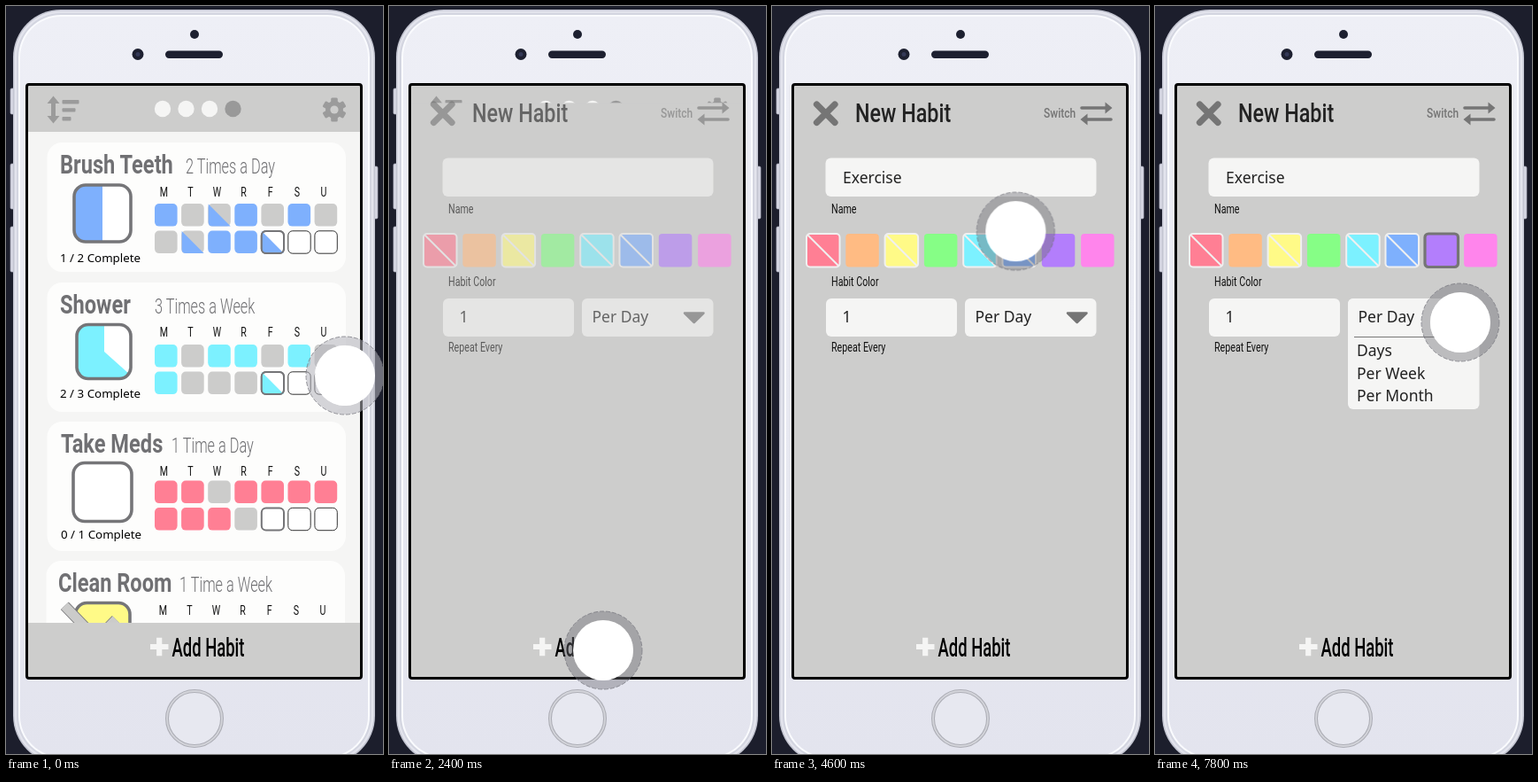
An HTML page that plays this animation: 426 by 844 pixels, repeating every 8000 ms.

```html
<!DOCTYPE html>
<html lang="en">
<head>
<meta charset="utf-8">
<title>Habit tracker</title>
<style>
  html, body { margin: 0; width: 100%; height: 100%; overflow: hidden; background: #1c1e2c; }
  svg { display: block; width: 426px; height: 844px; }
  text { font-family: "Noto Sans", "Open Sans", sans-serif; fill: #111; }
  .title { font: 600 29px Roboto, sans-serif; fill: #707073; }
  .light { font: 300 23px Roboto, sans-serif; fill: #6f6f72; }
  .day { font: 400 14px Roboto, sans-serif; text-anchor: middle; }
  .label { font: 400 15.3px Roboto, sans-serif; }
  .button { font: 500 29px Roboto, sans-serif; fill: #000; }
  .heading { font: 500 29.5px Roboto, sans-serif; fill: #222; }
  .switch { font: 500 15px Roboto, sans-serif; fill: #757575; }
  .note { font-size: 13.35px; fill: #000; }
  .input { font-size: 17.5px; fill: #222; }

  #list, #bar, #sheet, #form, #typed, #picked, #menu, #touch, #ring {
    animation: 8s linear infinite both;
  }
  #list { animation-name: scroll; }
  #bar { animation-name: bar; }
  #sheet { animation-name: rise; transform-origin: 0 757px; }
  #form { animation-name: form; }
  #typed { animation-name: typed; }
  #picked { animation-name: picked; }
  #menu { animation-name: menu; }
  #touch { animation-name: touch; }
  #ring { animation-name: ring; }

  @keyframes scroll {
    0%, 1.9% { transform: translateY(0); animation-timing-function: ease-in-out; }
    7%, 13% { transform: translateY(-87px); }
    17%, 100% { transform: translateY(-86px); }
  }
  @keyframes bar {
    0%, 1.9% { opacity: 0; }
    3.5%, 11% { opacity: 1; }
    15%, 100% { opacity: 0; }
  }
  @keyframes rise {
    0%, 27% { transform: scaleY(.0915); animation-timing-function: ease-out; }
    30.5%, 100% { transform: scaleY(1); }
  }
  @keyframes form {
    0%, 28.5% { opacity: 0; }
    31%, 100% { opacity: 1; }
  }
  @keyframes typed {
    0%, 47% { opacity: 0; }
    51%, 100% { opacity: 1; }
  }
  @keyframes picked {
    0%, 65% { opacity: 0; }
    67.5%, 100% { opacity: 1; }
  }
  @keyframes menu {
    0%, 92.5% { opacity: 0; }
    95.5%, 100% { opacity: 1; }
  }
  @keyframes touch {
    0%, 15% { transform: translate(383px, 417px); animation-timing-function: ease-in-out; }
    23.75%, 31.25% { transform: translate(242px, 727px); animation-timing-function: ease-in; }
    35% { transform: translate(183px, 512px); animation-timing-function: ease-out; }
    40%, 55% { transform: translate(110px, 196px); animation-timing-function: ease-in; }
    57.5% { transform: translate(275px, 254px); animation-timing-function: ease-out; }
    60.5%, 76% { transform: translate(324px, 276px); animation-timing-function: ease-in; }
    82.5% { transform: translate(226px, 329px); animation-timing-function: ease-out; }
    89%, 100% { transform: translate(345px, 357px); }
  }
  @keyframes ring {
    0%, 15% { stroke: #b4b4bc; opacity: .55; }
    23%, 100% { stroke: #6e6e76; opacity: .42; }
  }
</style>
</head>
<body>
<svg id="stage" viewBox="0 0 426 844"></svg>
<script>
const GREY = '#cdcdcc', EDGE = '#757578', PALE = '#f5f5f4';
const RED = '#ff7f94', YELLOW = '#fffa87', CYAN = '#7cf1ff', BLUE = '#7eb0fd';

const rect = (x, y, w, h, r, fill, extra = '') =>
  `<rect x="${x}" y="${y}" width="${w}" height="${h}" rx="${r}" fill="${fill}" ${extra}/>`;
const circle = (x, y, r, fill, extra = '') =>
  `<circle cx="${x}" cy="${y}" r="${r}" fill="${fill}" ${extra}/>`;
const path = (d, fill, extra = '') => `<path d="${d}" fill="${fill}" ${extra}/>`;
const line = (d, color, width, extra = '') =>
  path(d, 'none', `stroke="${color}" stroke-width="${width}" ${extra}`);
const group = (id, ...parts) => `<g id="${id}">${parts.join('')}</g>`;

// Condensed look of each text style
const narrow = { title: .815, light: .71, day: .76, label: .7, button: .635, heading: .79, switch: .8 };
const text = (style, x, y, words) =>
  `<text class="${style}" transform="translate(${x} ${y}) scale(${narrow[style] || 1} 1)">${words}</text>`;

function phone() {
  const key = (x, y, h) => rect(x, y, 5, h, 1.5, '#d5d6e2', 'stroke="#a9abba" stroke-width=".7"');
  const shell = (inset, fill) =>
    rect(8 + inset, 4 + inset, 409 - 2 * inset, 851 - 2 * inset, 54 - inset, fill);
  return key(5, 93, 29) + key(5, 178, 51) + key(5, 249, 51) + key(415, 181, 59)
    + shell(0, '#c3c5d1') + shell(1.5, '#e3e4ed') + shell(4, '#d3d5e0')
    + shell(6, '#fafbfe') + shell(8, 'url(#shell)')
    + circle(213, 32, 5, '#1d2030')
    + circle(149, 54.5, 6.5, '#1d2030') + circle(149, 54.5, 2.5, '#343957')
    + rect(180, 50.5, 65, 8.5, 4.2, '#1d2030')
    + circle(213, 804, 31, '#e7e8f0', 'stroke="#adaeb6" stroke-width="4"')
    + circle(213, 804, 31, 'none', 'stroke="#d3d4da" stroke-width="1.8"');
}

// c: done, g: missed, h: half done, t: today, p: today half done, e: to come
function cell(kind, x, y, color) {
  const half = path(`M${x + .5} ${y + .5}V${y + 21}q0 4.5 4.5 4.5H${x + 25.5}Z`, color);
  const border = fill => rect(x + .4, y + .4, 25.2, 25.2, 5, fill, `stroke="${EDGE}" stroke-width="2"`);
  return {
    c: rect(x, y, 25.6, 25.6, 5, color),
    g: rect(x, y, 25.6, 25.6, 5, '#cccccb'),
    h: rect(x, y, 25.6, 25.6, 5, '#cccccb') + half,
    t: border('#fff'),
    p: border('#fff') + half + border('none'),
    e: rect(x + .3, y + .3, 25.4, 25.4, 5, '#fff', 'stroke="#333" stroke-width="1"'),
  }[kind];
}

const cards = [
  { name: 'Brush Teeth', x: 46.5, top: 154, nameX: 61, often: '2 Times a Day', oftenX: 203, note: '1 / 2 Complete', noteX: 61,
    noteY: 288.5, box: [77, 202, 64], color: BLUE, gridY: 223, rows: ['cghcgcg', 'ghccpee'], done: 'M77 202H109V266H77Z' },
  { name: 'Shower', x: 46.5, top: 312, nameX: 61, often: '3 Times a Week', oftenX: 168, note: '2 / 3 Complete', noteX: 61,
    noteY: 442, box: [80, 359.5, 61], color: CYAN, gridY: 382, rows: ['cgccgcg', 'cgggpee'], done: 'M80 359H111V390L139 415V421H80Z' },
  { name: 'Take Meds', x: 46.5, top: 469, nameX: 62, often: '1 Time a Day', oftenX: 187, note: '0 / 1 Complete', noteX: 62,
    noteY: 600.5, box: [76, 515.5, 66], color: RED, gridY: 535.5, rows: ['ccgcccc', 'cccgtee'], done: '' },
  { name: 'Clean Room', x: 45.5, top: 626, nameX: 59, often: '1 Time a Week', oftenX: 196, note: 'Completed!', noteX: 73,
    noteY: 756, box: [78.5, 673.5, 61.5], color: YELLOW, gridY: 696, rows: ['gggggcg', 'gcggtee'], done: 'M78 673H141V736H78Z', check: true },
];

function card(c, i) {
  const [bx, by, size] = c.box;
  const frame = (fill, extra) => rect(bx, by, size, size, 13, fill, extra);
  const columnX = n => c.x + 121.5 + n * 30.1;
  const cells = c.rows.map((row, r) =>
    [...row].map((kind, n) => cell(kind, columnX(n), c.gridY + r * 30.5, c.color)).join('')).join('');
  const letters = [...'MTWRFSU'].map((d, n) => text('day', columnX(n) + 10.3, c.top + 60.5, d)).join('');
  const tick = 'M66.3 676.8L102.5 714.5L124.3 692.3';
  return rect(c.x, c.top, 337.5, 146, 17, '#fdfdfc')
    + text('title', c.nameX, c.top + 35.3, c.name)
    + text('light', c.oftenX, c.top + 34.8, c.often)
    + `<clipPath id="box${i}">${frame('#fff')}</clipPath>`
    + frame('#fff')
    + path(c.done, c.color, `clip-path="url(#box${i})"`)
    + frame('none', `stroke="${EDGE}" stroke-width="3.6"`)
    + (c.check ? line(tick, '#7c7c7e', 12.4, 'stroke-linecap="butt"') + line(tick, '#cbcbca', 10.6) : '')
    + text('note', c.noteX, c.noteY, c.note)
    + letters + cells;
}

function header() {
  const teeth = [0, 60, 120].map(a =>
    rect(367.2, 103.5, 7.6, 27, 1.5, '#9b9b9b', `transform="rotate(${a} 371 117)"`)).join('');
  return rect(25, 90, 375, 52, 0, GREY)
    + path('M53.5 101.5L60.5 110H56V124H60.5L53.5 132.5L46.5 124H51V110H46.5Z', '#9b9b9b')
    + [[106, 19], [115.2, 15], [125, 10]].map(([y, w]) => rect(63.5, y, w, 4.4, 1, '#9b9b9b')).join('')
    + [177, 203.5, 230].map(x => circle(x, 116, 9.2, PALE)).join('')
    + circle(256.5, 116, 9.2, '#999')
    + teeth + circle(371, 117, 10, '#9b9b9b') + circle(371, 117, 4.6, GREY);
}

function swatches() {
  const colors = [RED, '#ffbb83', YELLOW, '#86fe86', CYAN, BLUE, '#b37efc', '#ff85ec'];
  const used = [0, 2, 4, 5];
  return colors.map((color, i) => {
    const x = 39 + i * 44.3;
    return rect(x, 257, 37.5, 37.5, 4, color, used.includes(i) ? 'stroke="#f0f0f0" stroke-width="2"' : '')
      + (used.includes(i) ? line(`M${x + 1} 258l35.5 35.5`, '#f0f0f0', 2) : '');
  }).join('');
}

function form() {
  return line('M50.5 111L71 131.5M71 111L50.5 131.5', '#757575', 7.2, 'stroke-linecap="round"')
    + text('heading', 94, 131, 'New Habit')
    + text('switch', 307, 126, 'Switch')
    + line('M350 115H378M383 128H355', '#757575', 3.6, 'stroke-linecap="round"')
    + path('M376.5 108.5L384.5 115L376.5 121.5ZM356.5 121.5L348.5 128L356.5 134.5Z', '#757575')
    + rect(60.5, 171.5, 306, 43.5, 6, PALE)
    + text('label', 67, 233.5, 'Name')
    + swatches()
    + text('label', 67, 316, 'Habit Color')
    + rect(61, 330, 148, 43, 6, PALE)
    + rect(218, 330, 148.5, 43, 6, PALE)
    + text('input', 79.5, 357, '1')
    + text('label', 67, 390, 'Repeat Every')
    + group('menu',
      rect(218, 330, 148.5, 125, 6, PALE),
      line('M225 373.5H360', '#777', 1.2),
      ...['Days', 'Per Week', 'Per Month'].map((w, i) => text('input', 228, 395 + i * 25.5, w)))
    + text('input', 229.5, 357, 'Per Day')
    + path('M334 346.5H355.5L344.7 357Z', '#757575', 'stroke="#757575" stroke-width="2.5" stroke-linejoin="round"')
    + group('typed', text('input', 80, 200, 'Exercise'))
    + group('picked', rect(305, 257, 37.5, 37.5, 4, 'none', 'stroke="#757575" stroke-width="3.2"'));
}

const touch = group('touch',
  '<circle id="ring" r="39" fill="none" stroke-width="10"/>',
  circle(0, 0, 44, 'none', 'stroke="#77777f" stroke-width="1" stroke-dasharray="5 2" opacity=".75"'),
  circle(0, 0, 34, '#fff'));

document.getElementById('stage').innerHTML = `
  <defs>
    <linearGradient id="shell" x2="0" y2="1">
      <stop stop-color="#eeeff6"/><stop offset="1" stop-color="#e3e4ee"/>
    </linearGradient>
    <clipPath id="screen">${rect(24, 89, 377, 669, 2, '#fff')}</clipPath>
  </defs>`
  + rect(0, 0, 426, 844, 0, '#1c1e2c')
  + phone()
  + '<g clip-path="url(#screen)">'
  + rect(24, 89, 377, 669, 0, PALE)
  + group('list', ...cards.map(card))
  + header()
  + group('bar', rect(392, 100, 4.6, 591, 2.3, '#868686'))
  + group('sheet', rect(24, 90, 377, 667, 0, GREY))
  + group('form', form())
  + line('M163 723H183.5M173.2 712.7V733.3', PALE, 6.2)
  + text('button', 187.5, 734, 'Add Habit')
  + '</g>'
  + rect(23.5, 88.5, 378, 670, 2.5, 'none', 'stroke="#000" stroke-width="3"')
  + touch;
</script>
</body>
</html>
```
